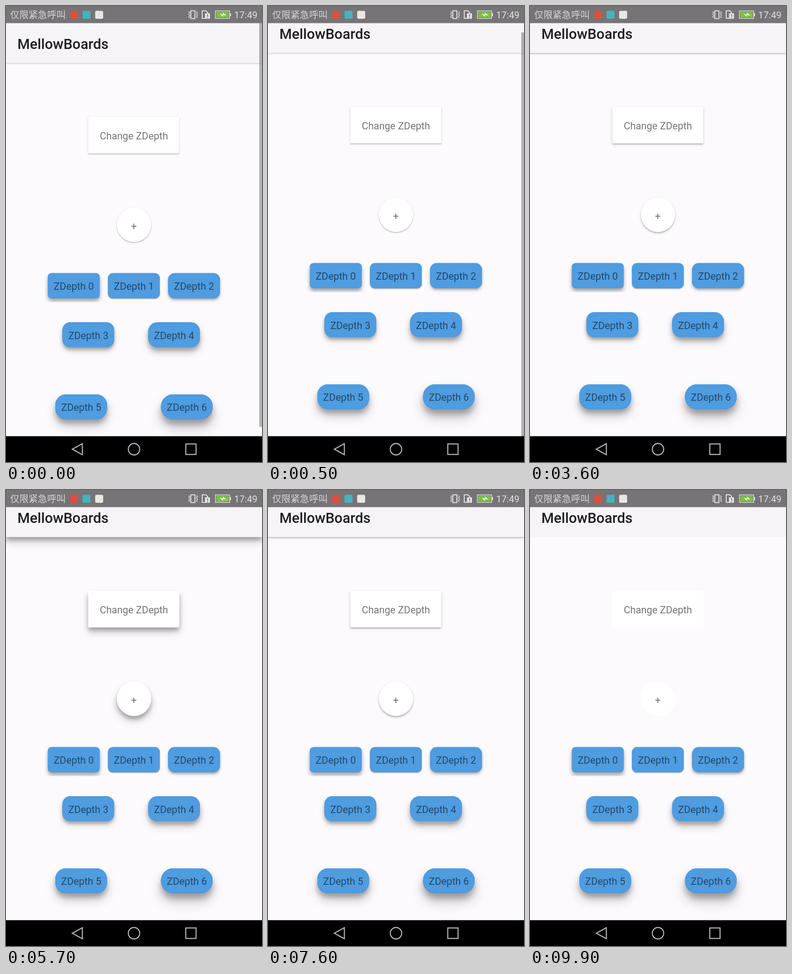
These frames come from a looping animation (561x998 px, 10000 ms). An HTML page with a canvas:

```html
<!DOCTYPE html>
<html lang="en">
<head>
<meta charset="utf-8">
<title>Depth demo</title>
<style>
  html, body { margin: 0; width: 100%; height: 100%; overflow: hidden; background: #000; }
  canvas { display: block; }
</style>
</head>
<body>
<canvas id="stage" width="561" height="998"></canvas>
<script>
const ctx = document.getElementById('stage').getContext('2d');
const LOOP = 10000, STEP = 100, TAP_MS = 300;
const W = 561, H = 998, MID = 280.3, STATUS_H = 37.4, NAV_Y = 941.5;
const FONT = 'Roboto, "Noto Sans", sans-serif';
const INK = 'rgba(0,0,0,.54)', LIGHT = '#e4e2e4', GREY = '#767476';

// Each tap raises or lowers the depth by one
const RAISE = [2900, 3500, 4300, 4800, 5900];
const LOWER = [700, 6600, 6880, 7160, 7440, 8150];

const progress = (t, from, length) => Math.min(1, Math.max(0, (t - from) / length));

function depthAt(t) {
  const moved = taps => taps.reduce((sum, tap) => sum + progress(t, tap, TAP_MS), 0);
  return 1 + moved(RAISE) - moved(LOWER);
}

// Wide ambient shadow and tight key shadow for a depth
function shadows(depth) {
  const on = Math.min(1, depth);
  return [
    { y: Math.max(0, 3.4 * depth - 2.4), blur: 4.6 * depth, alpha: on * (.1 + .02 * depth) },
    { y: 1.7 * depth, blur: 2.1 * depth, alpha: on * .24 }
  ];
}

function card(x, y, w, h, r, color, depth) {
  ctx.save();
  for (const s of shadows(depth)) {
    ctx.shadowOffsetY = s.y;
    ctx.shadowBlur = s.blur;
    ctx.shadowColor = `rgba(0,0,0,${s.alpha})`;
    box(x, y, w, h, color, r);
  }
  ctx.restore();
  box(x, y, w, h, color, r);
}

function box(x, y, w, h, color, r = 0) {
  ctx.fillStyle = color;
  ctx.beginPath();
  ctx.roundRect(x, y, w, h, r);
  ctx.fill();
}

function text(str, x, y, size, color, align = 'center', weight = 400, family = FONT) {
  ctx.font = `${weight} ${size}px ${family}`;
  ctx.textAlign = align;
  ctx.fillStyle = color;
  ctx.fillText(str, x, y);
}

function trace(points, close) {
  ctx.beginPath();
  points.forEach(([x, y]) => ctx.lineTo(x, y));
  if (close) ctx.closePath();
}

function chip(n, cx, y) {
  ctx.save();
  if (n === 0) {
    ctx.beginPath();
    ctx.rect(cx - 65, y - 8, 130, 71.5);
    ctx.clip();
  }
  card(cx - 56.7, y, 113.4, 54.8, 7.8 + 3.1 * n, '#4f9ce0', n || 3);
  ctx.restore();
  text('ZDepth ' + n, cx, y + 36.2, 21.8, INK);
}

function drawPage(depth) {
  card(0, STATUS_H, W, 87.3, 0, '#f6f4f7', depth);
  text('MellowBoards', 25, 94, 31.2, '#1f1e20', 'left', 500);

  card(180.5, 243, 199, 79.5, 1, '#fff', depth);
  text('Change ZDepth', MID, 292, 21.8, INK);

  card(243, 441.5, 75, 75, 37.5, '#fff', depth);
  text('+', MID, 490, 21.8, INK);

  for (let i = 0; i < 3; i++) chip(i, MID + (i - 1) * 131.8, 584.8);
  for (let i = 0; i < 2; i++) {
    chip(3 + i, 180.4 + i * 187.9, 692.3);
    chip(5 + i, 164.8 + i * 231.5, 849.9);
  }
}

function drawStatus() {
  box(0, 0, W, STATUS_H, GREY);
  text('仅限紧急呼叫', 9, 27, 20.3, '#d8d6d8', 'left', 400,
    '"Noto Sans CJK SC", "Noto Sans CJK", sans-serif');
  ['#d8513f', '#45b3bd', '#e9e7e3'].forEach((color, i) =>
    box(140 + 27.7 * i, 10.5, 17.5, 17.5, color, 3));

  // Vibrating phone
  ctx.strokeStyle = LIGHT;
  ctx.lineWidth = 2;
  ctx.strokeRect(405, 10.5, 9, 17);
  ctx.lineWidth = 1.5;
  for (const x of [400.5, 417.5]) {
    trace(Array.from({ length: 6 }, (_, i) => [x + 2 * (i % 2), 12 + 2.8 * i]));
    ctx.stroke();
  }

  // SIM card with alert
  ctx.lineWidth = 2;
  trace([[430, 27], [430, 10.5], [438, 10.5], [442, 14.5], [442, 27]], true);
  ctx.stroke();
  box(436, 16, 11, 12, LIGHT, 1);
  box(440.7, 18, 2, 5, GREY);
  box(440.7, 24.5, 2, 2, GREY);

  // Battery
  ctx.lineWidth = 1.5;
  ctx.strokeRect(459, 10.7, 31, 16.5);
  box(490.5, 15.5, 2.5, 7, LIGHT);
  box(461, 12.7, 27, 12.5, '#7cc142');
  trace([[468, 17], [476, 19], [475, 14], [483, 21], [475, 19.7], [476, 24]], true);
  ctx.fillStyle = '#f4f6f0';
  ctx.fill();

  text('17:49', 551, 27, 20.5, LIGHT, 'right');
}

function drawNav() {
  box(0, NAV_Y, W, H - NAV_Y, '#000');
  ctx.strokeStyle = '#b8b6b8';
  ctx.lineWidth = 2.3;
  trace([[145.3, 970], [167.3, 958], [167.3, 982]], true);
  ctx.stroke();
  ctx.beginPath();
  ctx.arc(280.5, 970, 12.5, 0, Math.PI * 2);
  ctx.stroke();
  ctx.strokeRect(394, 958.5, 22.5, 23);
}

function draw(t) {
  const scroll = 1 - (1 - progress(t, 0, 400)) ** 2;
  const barAlpha = .29 * (1 - progress(t, 750, 300));
  box(0, 0, W, H, '#fcfafd');
  ctx.save();
  ctx.translate(0, -22 * scroll);
  drawPage(Math.max(0, depthAt(t)));
  ctx.restore();
  box(555, 37 + 21 * scroll, 6, 884, `rgba(0,0,0,${barAlpha})`);
  drawStatus();
  drawNav();
}

const start = performance.now();
function tick() {
  const t = (performance.now() - start) % LOOP;
  draw(Math.floor(t / STEP) * STEP);
  requestAnimationFrame(tick);
}
tick();
</script>
</body>
</html>
```
